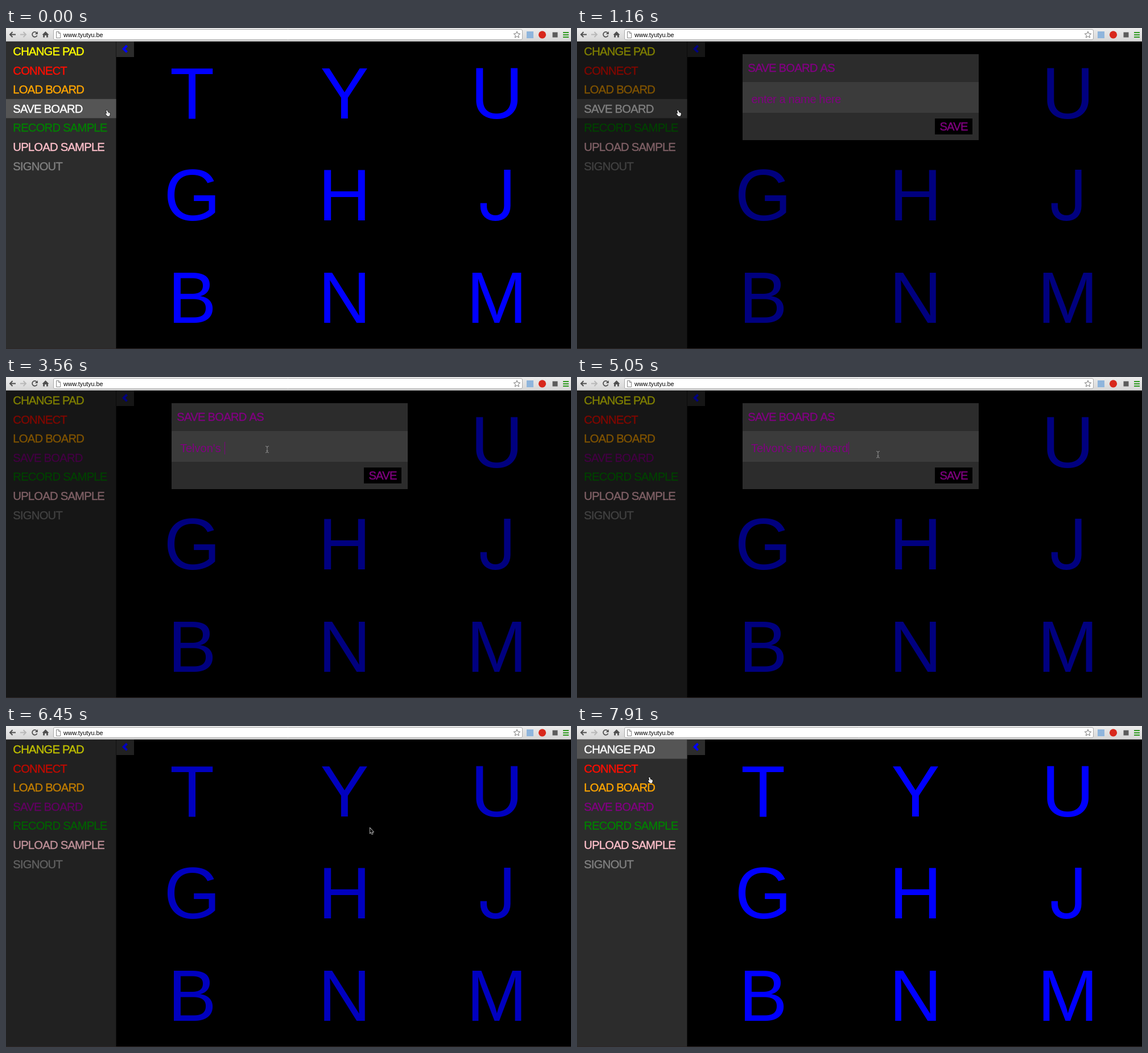
These frames come from a looping animation (993 by 564 pixels, 8 s). An HTML page with a canvas:

```html
<!DOCTYPE html>
<html lang="en">
<head>
<meta charset="utf-8">
<title>Save board</title>
<style>
html, body { margin: 0; width: 100%; height: 100%; overflow: hidden; background: #000; }
canvas { display: block; }
</style>
</head>
<body>
<canvas id="stage" width="993" height="564"></canvas>
<script>
const W = 993, H = 564, LOOP = 8000, TOP = 24;
const SANS = '"Liberation Sans", Arial, sans-serif';
const PLAIN = 'Inter, sans-serif';
const PANEL = '#2c2c2c', PURPLE = '#800080', BLUE = '#0000ff';
const NAME = "Telvon's new board";

const stage = document.getElementById('stage').getContext('2d');
const layerCanvas = document.createElement('canvas');
layerCanvas.width = W;
layerCanvas.height = H;
const layer = layerCanvas.getContext('2d');

const MENU = [
  ['CHANGE PAD', '#ffff00'],
  ['CONNECT', '#ff0d00'],
  ['LOAD BOARD', '#ffa500'],
  ['SAVE BOARD', PURPLE],
  ['RECORD SAMPLE', '#008000'],
  ['UPLOAD SAMPLE', '#ffc0cb'],
  ['SIGNOUT', '#808080']
];
const ROW = 33.6;

// Stepped tracks: [start time, value...]
const DIM = [[0, 0], [750, 0.25], [1160, 0.5], [6450, 0.25], [6600, 0]];
const DIALOG = [[0, 0, 0], [1160, 1, 0], [6240, 0.75, -5], [6450, 0, 0]];
const HOVER = [[0, 3], [1520, -1], [7460, 0]];
const TYPED = [[0, 0], [2680, 1], [2825, 2], [2970, 3], [3115, 5], [3260, 6], [3560, 9],
  [4010, 11], [4160, 13], [4460, 15], [4610, 17], [4900, 18]];
const CARET = [[0, false], [1940, true], [2380, false], [2680, true], [6240, false]];
const BUTTON = [[0, 'idle'], [5500, 'hover'], [6240, 'focus']];
const CURSOR = [
  [0, 'hand', 174, 143.5], [1520, 'beam', 459, 127],
  [5050, 'beam', 529, 136], [5200, 'arrow', 580, 150], [5350, 'arrow', 614, 164],
  [5500, 'hand', 630, 174], [5640, 'hand', 634, 178], [5790, 'hand', 636, 179.5],
  [6450, 'arrow', 639, 179], [6860, 'arrow', 568, 172],
  [7160, 'arrow', 420, 116], [7310, 'arrow', 262, 66], [7460, 'hand', 166, 40],
  [7610, 'hand', 138, 38], [7760, 'hand', 126, 44], [7910, 'hand', 124, 89]
];

const HAND = new Path2D('M2.2 1.6Q3.2 .2 4.2 1.6L5 4.8L8 5.4Q9.2 6 8.8 8L7.8 11.2H4.2L1.1 7.6Q.5 6.4 1.9 6.4L3.2 7.2Z');
const ARROW = new Path2D('M.5 0V9.6L2.7 7.6L4.2 11.2L5.8 10.5L4.3 7.1H7.2Z');

function at(track, t) {
  let hit = track[0];
  for (const key of track) if (key[0] <= t) hit = key;
  return hit.slice(1);
}

function box(c, color, x, y, w, h) {
  c.fillStyle = color;
  c.fillRect(x, y, w, h);
}

function text(c, str, x, y, color, size = 20, tracking = 0, family = SANS) {
  c.font = `${size}px ${family}`;
  c.letterSpacing = tracking + 'px';
  c.fillStyle = color;
  c.fillText(str, x, y);
}

// Capital labels, set tight and slightly heavier
function label(c, str, x, y, color) {
  text(c, str, x, y, color, 20.2, -0.75);
  c.strokeStyle = color;
  c.lineWidth = 0.4;
  c.strokeText(str, x, y);
}

function stroke(c, path, color, width) {
  c.strokeStyle = color;
  c.lineWidth = width;
  c.stroke(new Path2D(path));
}

function circle(c, color, x, y, r) {
  c.fillStyle = color;
  c.beginPath();
  c.arc(x, y, r, 0, Math.PI * 2);
  c.fill();
}

function star(c, x, y, r) {
  c.beginPath();
  for (let i = 0; i < 10; i++) {
    const a = i * Math.PI / 5 - Math.PI / 2, d = i % 2 ? r * 0.45 : r;
    c.lineTo(x + d * Math.cos(a), y + d * Math.sin(a));
  }
  c.closePath();
  c.strokeStyle = '#777';
  c.lineWidth = 1;
  c.stroke();
}

function drawToolbar(c) {
  const shade = c.createLinearGradient(0, 0, 0, TOP);
  shade.addColorStop(0, '#ececec');
  shade.addColorStop(1, '#d6d6d6');
  box(c, shade, 0, 0, W, TOP);
  box(c, '#8a8a8a', 0, TOP - 1, W, 1);

  stroke(c, 'M17 11.5H7M11.5 7L7 11.5L11.5 16', '#505050', 2);
  stroke(c, 'M25 11.5H35M30.5 7L35 11.5L30.5 16', '#b8b8b8', 2);
  stroke(c, 'M53.8 8.4A4.4 4.4 0 1 0 54.6 13', '#505050', 1.8);
  c.fillStyle = '#505050';
  c.fill(new Path2D('M55.8 6V11H50.8Z'));
  c.fill(new Path2D('M69.5 6L75.5 12H73.8V16.6H71V13H68V16.6H65.2V12H63.5Z'));

  c.beginPath();
  c.roundRect(83.5, 2.5, 824, 18, 2.5);
  c.fillStyle = '#fff';
  c.fill();
  c.strokeStyle = '#a9a9a9';
  c.lineWidth = 1;
  c.stroke();
  stroke(c, 'M88.5 6.5H93L95.5 9V17.5H88.5ZM92.5 6.5V9.5H95.5', '#888', 1);
  text(c, 'www.tyutyu.be', 101, 15.5, '#000', 10.8);
  star(c, 898, 12, 6);

  box(c, '#8fb5dc', 915, 6, 12, 12);
  circle(c, '#d8281c', 942.5, 11.8, 6.6);
  box(c, '#5c5c5c', 960.5, 7.5, 9, 9);
  for (let i = 0; i < 3; i++) box(c, '#2f9a20', 979, 7 + i * 4, 10, 2);
}

function drawPads(c) {
  c.textAlign = 'center';
  ['TYU', 'GHJ', 'BNM'].forEach((row, r) => {
    [...row].forEach((ch, k) => {
      const x = 327.2 + 267.7 * k, y = 158.5 + 179.7 * r;
      // The pad J has no bar on top
      if (ch === 'J') text(c, ch, x, y, BLUE, 122, 0, PLAIN);
      else text(c, ch, x, y, BLUE, 128);
    });
  });
  c.textAlign = 'left';
}

function drawPage(c, hover) {
  box(c, '#000', 0, TOP, W, H - TOP);
  box(c, PANEL, 0, TOP, 193.5, 539);
  box(c, PANEL, 194, TOP, 31, 27);
  stroke(c, 'M212.6 31L206.8 36.7L212.6 42.4', BLUE, 4);

  MENU.forEach(([name, color], i) => {
    const on = i === hover;
    if (on) box(c, '#555', 0, TOP + ROW * i, 193.5, ROW);
    label(c, name, 12.3, 48 + ROW * i, on ? '#fff' : color);
  });
  drawPads(c);
}

function drawDialog(c, t) {
  const [button] = at(BUTTON, t);
  const [count] = at(TYPED, t);
  const [caret] = at(CARET, t);
  box(c, PANEL, 291, 46, 415, 151);
  box(c, '#3b3b3b', 291, 95, 415, 54);
  label(c, 'SAVE BOARD AS', 300.3, 77, PURPLE);

  if (t < 1940) {
    text(c, 'enter a name here', 306.5, 132, PURPLE, 20, -0.35);
  } else {
    const typed = NAME.slice(0, count);
    text(c, typed, 306, 132, PURPLE);
    if (caret) box(c, PURPLE, Math.round(306.6 + c.measureText(typed).width), 114, 1, 22);
  }

  const idle = button === 'idle';
  box(c, idle ? '#000' : '#7c7c7c', 629, 159, 66, 28);
  if (button === 'focus') {
    c.beginPath();
    c.roundRect(628.5, 158.5, 67, 29, 2);
    c.strokeStyle = '#3f75b0';
    c.lineWidth = 2;
    c.stroke();
  }
  label(c, 'SAVE', 637.4, 180, idle ? PURPLE : '#fff');
}

function drawCursor(c, kind, x, y) {
  c.save();
  c.translate(x, y);
  if (kind === 'beam') {
    stroke(c, 'M-3 -5.5Q0 -5.5 0 -3.5Q0 -5.5 3 -5.5M0 -4V5M-3 6Q0 6 0 4Q0 6 3 6M-1.5 2.5H1.5', '#8c8c8c', 1);
  } else {
    const hand = kind === 'hand', shape = hand ? HAND : ARROW;
    c.lineJoin = 'round';
    c.strokeStyle = hand ? '#000' : '#fff';
    c.lineWidth = 1.2;
    c.stroke(shape);
    c.fillStyle = hand ? '#fff' : '#111';
    c.fill(shape);
    if (hand) stroke(c, 'M5 6.2V7.8M6.7 6.6V8', '#555', 0.7);
  }
  c.restore();
}

function draw(t) {
  const [dim] = at(DIM, t);
  const [alpha, shift] = at(DIALOG, t);
  drawToolbar(stage);
  drawPage(stage, at(HOVER, t)[0]);
  box(stage, `rgba(0,0,0,${dim})`, 0, TOP, W, H - TOP);
  box(stage, '#2e2626', 0, 563, W, 1);

  if (alpha > 0) {
    layer.clearRect(0, 0, W, H);
    drawDialog(layer, t);
    stage.globalAlpha = alpha;
    stage.drawImage(layerCanvas, 0, shift);
    stage.globalAlpha = 1;
  }
  drawCursor(stage, ...at(CURSOR, t));
}

const start = performance.now();
function tick() {
  draw((performance.now() - start) % LOOP);
  requestAnimationFrame(tick);
}
tick();
</script>
</body>
</html>
```
